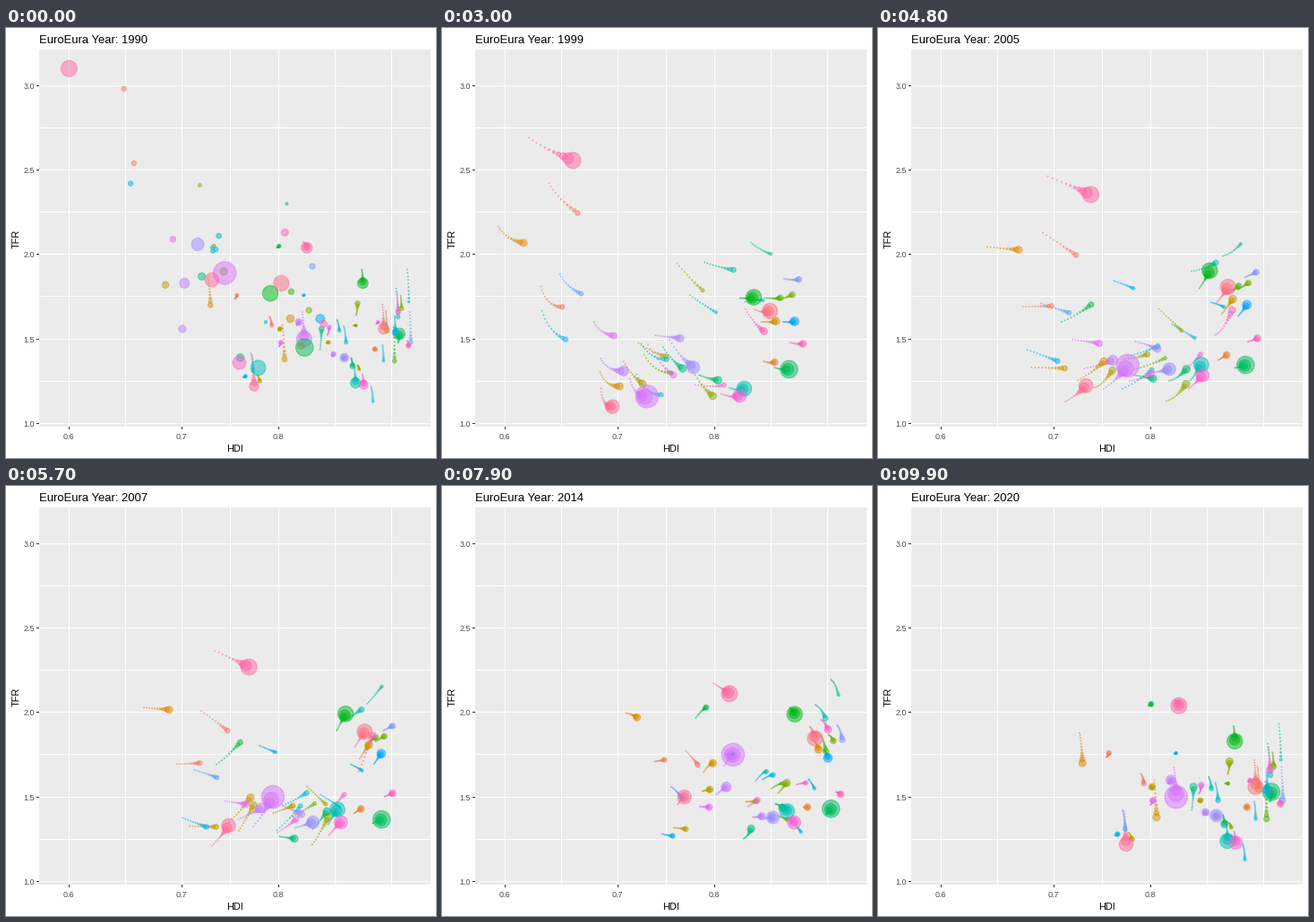
A matplotlib script for the animation above (10 s loop, 480x480 px).

```python
import numpy as np
import matplotlib.pyplot as plt
from matplotlib.animation import FuncAnimation
from matplotlib.patches import Rectangle

SIZE, DPI = 480, 72
FRAMES, WAKE = 100, 10
LEFT, TOP, RIGHT, BOTTOM = 37, 24, 474, 445

plt.rcParams["font.family"] = "Liberation Sans"

years = np.linspace(1990, 2020, FRAMES)
t = np.linspace(0, 1, FRAMES)

# depth of the HDI slump in the nineties, years where fertility turns
WEST = 0, (1990, 1998, 2010, 2020)
CENTRE = 0.02, (1990, 2001, 2010, 2020)
EAST = 0.062, (1990, 1999, 2014, 2020)


def x_px(hdi):
    return 304.3 + 813.5 * np.log(hdi / 0.8)


def y_px(tfr):
    return 441.5 - 188.7 * (tfr - 1)


def hue_colour(deg, chroma=100, light=65):
    """Polar LUV hue to sRGB."""
    a = np.radians(deg)
    u = chroma * np.cos(a) / (13 * light) + 0.1978
    v = chroma * np.sin(a) / (13 * light) + 0.4683
    y = ((light + 16) / 116) ** 3
    x, z = 9 * y * u / (4 * v), y * (12 - 3 * u - 20 * v) / (4 * v)
    lin = np.clip([3.2406 * x - 1.5372 * y - 0.4986 * z,
                   -0.9689 * x + 1.8758 * y + 0.0415 * z,
                   0.0557 * x - 0.2040 * y + 1.0570 * z], 0, 1)
    return np.where(lin <= 0.0031308, 12.92 * lin,
                    1.055 * lin ** (1 / 2.4) - 0.055)


def hdi_curve(first, last, dip):
    """Growth that slows down, less a slump that heals."""
    s = t / 0.23
    grow = 1 - (1 - t) ** 1.9
    return first + (last - first) * grow - dip * (s * np.exp(1 - s)) ** 2


def tfr_curve(knots, values):
    """Monotone cubic through the turning points."""
    knots, values = np.array(knots), np.array(values)
    step = np.diff(knots)
    d = np.diff(values) / step
    a, b = d[:-1], d[1:]
    same = a * b > 0
    mid = np.where(same, 2 * a * b / np.where(same, a + b, 1), 0)
    m = np.concatenate(([1.5 * d[0]], mid, [1.5 * d[-1]]))
    i = np.clip(np.searchsorted(knots, years, "right") - 1, 0, len(d) - 1)
    u, h = (years - knots[i]) / step[i], step[i]
    rise = u * u * (3 - 2 * u)
    return (values[i] * (1 - rise) + values[i + 1] * rise
            + h * u * (1 - u) * ((1 - u) * m[i] - u * m[i + 1]))


tracks = []


def add(bloc, people, hdi, tfr, since=1990):
    """People in millions, HDI ends in 1/1000, TFR turns in 1/100."""
    dip, knots = bloc
    x = x_px(hdi_curve(hdi[0] / 1000, hdi[1] / 1000, dip))
    y = y_px(tfr_curve(knots, np.array(tfr) / 100))
    size = 0.5 + 11 * np.sqrt(people / 146)
    tracks.append((x, y, size, years > since - 0.01))


# one country per call, in alphabetical order
add(EAST, 3, (647, 794), (298, 225, 169, 158))
add(EAST, 3, (656, 757), (254, 169, 172, 176))
add(WEST, 8, (825, 913), (146, 136, 144, 144))
add(EAST, 9, (616, 730), (262, 207, 197, 170), since=1995)
add(EAST, 10, (711, 808), (180, 122, 170, 138), since=1995)
add(WEST, 11, (813, 928), (162, 160, 184, 155))
add(EAST, 4, (640, 781), (170, 134, 131, 125), since=2000)
add(CENTRE, 8, (685, 802), (182, 121, 153, 156))
add(CENTRE, 4, (678, 857), (175, 138, 147, 148), since=1995)
add(CENTRE, 1, (718, 894), (241, 170, 140, 132))
add(CENTRE, 10, (742, 892), (190, 113, 150, 171))
add(WEST, 5, (834, 947), (167, 175, 187, 168))
add(EAST, 1, (732, 891), (205, 130, 158, 158))
add(WEST, 5, (814, 938), (178, 174, 187, 137))
add(WEST, 63, (791, 898), (177, 174, 203, 183))
add(EAST, 4, (680, 802), (175, 157, 203, 205), since=2000)
add(WEST, 82, (829, 944), (145, 132, 139, 153))
add(CENTRE, 11, (759, 886), (139, 125, 146, 134))
add(CENTRE, 10, (720, 849), (187, 129, 125, 156))
add(CENTRE, 0.3, (809, 957), (230, 199, 220, 172))
add(CENTRE, 4, (737, 943), (211, 190, 205, 163))
add(WEST, 58, (778, 889), (133, 120, 146, 124))
add(EAST, 2, (731, 871), (202, 117, 165, 155))
add(EAST, 3, (734, 879), (203, 138, 163, 148))
add(WEST, 0.5, (786, 924), (160, 173, 162, 137))
add(CENTRE, 0.4, (730, 911), (204, 160, 138, 113))
add(EAST, 3, (653, 766), (242, 150, 127, 128))
add(CENTRE, 0.6, (695, 829), (200, 185, 175, 176), since=2000)
add(WEST, 16, (847, 939), (162, 160, 178, 154))
add(EAST, 2, (673, 774), (230, 177, 150, 131), since=1995)
add(WEST, 5, (838, 959), (193, 185, 193, 148))
add(CENTRE, 38, (716, 876), (206, 130, 137, 139))
add(CENTRE, 10, (701, 863), (156, 149, 138, 141))
add(EAST, 21, (703, 824), (183, 131, 156, 160))
add(EAST, 146, (743, 830), (189, 116, 175, 150))
add(EAST, 7, (704, 804), (200, 152, 144, 148), since=1995)
add(CENTRE, 5, (692, 858), (209, 125, 143, 157))
add(WEST, 2, (705, 917), (133, 122, 157, 160), since=1995)
add(WEST, 43, (758, 899), (136, 116, 138, 123))
add(CENTRE, 9, (807, 943), (213, 152, 196, 166))
add(WEST, 8, (851, 956), (159, 147, 153, 146))
add(EAST, 68, (600, 833), (310, 256, 211, 204))
add(EAST, 48, (730, 775), (185, 110, 150, 122))
add(WEST, 61, (803, 924), (183, 166, 192, 156))

xs, ys, sizes, alive = (np.array(part) for part in zip(*tracks))
colours = np.array([hue_colour(15 + 360 * i / len(tracks))
                    for i in range(len(tracks))])

fig = plt.figure(figsize=(SIZE / DPI, SIZE / DPI), dpi=DPI, facecolor="white")
ax = fig.add_axes([0, 0, 1, 1])
ax.set(xlim=(0, SIZE), ylim=(SIZE, 0))
ax.axis("off")


def box(x, y, w, h, colour):
    ax.add_patch(Rectangle((x, y), w, h, fc=colour, lw=0, zorder=0,
                           antialiased=False))


def label(x, y, text, size, colour="black", **kw):
    return ax.text(x, y, text, fontsize=size, color=colour, **kw)


box(LEFT, TOP, RIGHT - LEFT, BOTTOM - TOP, "#EBEBEB")
for x in (70, 133, 196, 250, 304, 367, 430):
    box(x, TOP, 1, BOTTOM - TOP, "white")
for tfr in np.arange(1, 3.1, 0.25):
    box(LEFT, int(y_px(tfr)), RIGHT - LEFT, 1, "white")
for hdi, x in ((0.6, 70), (0.7, 196), (0.8, 304)):
    box(x, BOTTOM, 1, 3, "#333333")
    label(x, 459, f"{hdi:.1f}", 9, "#4D4D4D", ha="center")
for tfr in np.arange(1, 3.1, 0.5):
    y = int(y_px(tfr))
    box(LEFT - 3, y, 3, 1, "#333333")
    label(32, y + 4, f"{tfr:.1f}", 9, "#4D4D4D", ha="right")
label(255.5, 473, "HDI", 11, ha="center")
label(12, 235, "TFR", 11, ha="center", va="center", rotation=90)
title = label(37, 17, "", 13)

dots = ax.scatter([], [], linewidths=1.1, zorder=2)


def draw(frame):
    pts, areas, cols = [], [], []
    for age in range(WAKE, -1, -1):
        k = (frame - age) % FRAMES
        on = alive[:, k]
        radius = 1.067 * sizes[on] * (1 - age / WAKE) ** 4 + 0.45
        pts.append(np.column_stack((xs[on, k], ys[on, k])))
        areas.append((2 * radius) ** 2)
        cols.append(colours[on])
    rgb = np.vstack(cols)
    rgba = np.column_stack((rgb, np.full(len(rgb), 0.5)))
    dots.set_offsets(np.vstack(pts))
    dots.set_sizes(np.concatenate(areas), DPI)
    dots.set_facecolor(rgba)
    dots.set_edgecolor(rgba)
    title.set_text(f"EuroEura Year: {years[frame]:.0f}")
    return dots, title


anim = FuncAnimation(fig, draw, frames=FRAMES, interval=100,
                     repeat=True, repeat_delay=0)
plt.show()
```
